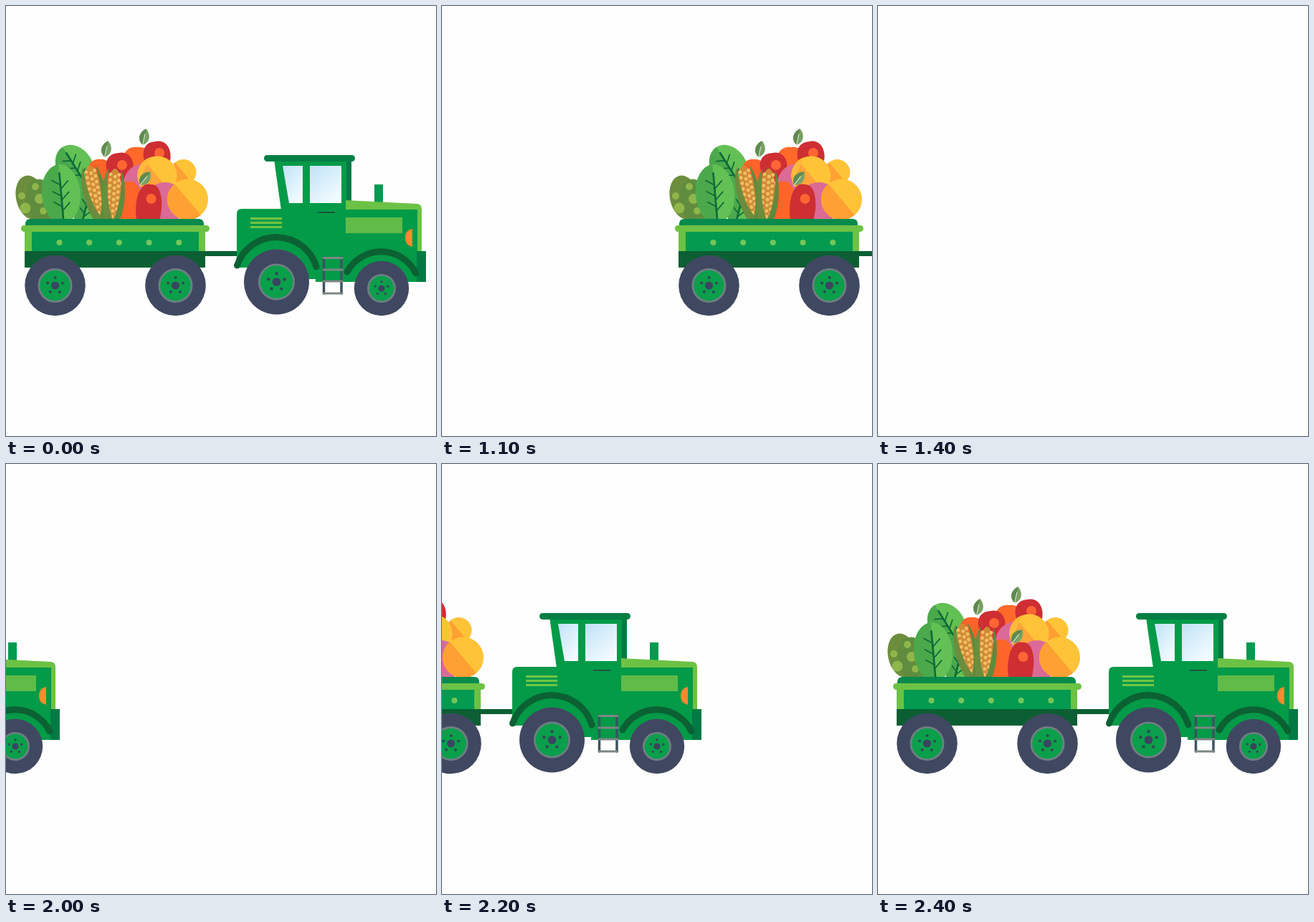
An HTML page for the animation above (3400 ms loop, 600 by 600 pixels).

```html
<!DOCTYPE html>
<html lang="en">
<head>
<meta charset="utf-8">
<title>Harvest tractor</title>
<style>
html, body { margin: 0; width: 100%; height: 100%; overflow: hidden; background: #fefefe; }
svg { display: block; width: 100%; height: 100%; }
</style>
</head>
<body>
<svg viewBox="0 0 600 600">
  <defs>
    <linearGradient id="glass" x2=".7" y2="1">
      <stop offset="0" stop-color="#bfe3f7"/><stop offset="1" stop-color="#f4fbff"/>
    </linearGradient>
    <clipPath id="above"><path d="M0 150H300V298H0Z"/></clipPath>
  </defs>
  <g id="rig">
    <g id="load" clip-path="url(#above)"></g>
    <g id="wagon"></g>
    <g id="tractor"></g>
    <g id="wheels"></g>
  </g>
</svg>
<script>
const $ = id => document.getElementById(id);
const G = { body: '#039a48', teal: '#049a50', dark: '#0b5f33', deep: '#007a44', light: '#6cc244', olive: '#6b8d3d' };

const rect = (x, y, w, h, fill, r = 0) =>
  `<rect x="${x}" y="${y}" width="${w}" height="${h}" rx="${r}" fill="${fill}"/>`;
const dot = (x, y, r, fill) => `<circle cx="${x}" cy="${y}" r="${r}" fill="${fill}"/>`;
const oval = (x, y, rx, ry, fill, turn = 0) =>
  `<ellipse cx="${x}" cy="${y}" rx="${rx}" ry="${ry}" fill="${fill}" transform="rotate(${turn} ${x} ${y})"/>`;
const shape = (d, fill) => `<path d="${d}" fill="${fill}"/>`;
const line = (d, color, w) =>
  `<path d="${d}" fill="none" stroke="${color}" stroke-width="${w}" stroke-linecap="round"/>`;
const place = (x, y, turn, inner) => `<g transform="translate(${x} ${y}) rotate(${turn})">${inner}</g>`;
const range = n => [...Array(n).keys()];

// Oval leaf with a darker left half and a branching vein
function leaf(x, y, rx, ry, turn) {
  const ribs = [-0.3, 0.08, 0.44].map(k =>
    `M0 ${ry * k}l${-rx * .42} ${-ry * .18}M0 ${ry * (k + .14)}l${rx * .4} ${-ry * .26}`).join('');
  return place(x, y, turn,
    oval(0, 0, rx, ry, '#63c054') +
    shape(`M0 ${-ry}A${rx} ${ry} 0 0 0 0 ${ry}Z`, '#4ba94c') +
    line(`M0 ${-ry * .7}V${ry}`, '#0b6a38', 2.6) + line(ribs, '#0b6a38', 1.7));
}

function corn(x, y, turn) {
  const grains = range(9).map(i => [-5, 1.5, 7].map((c, j) =>
    dot(c - 1, -28 + i * 8 + (j % 2) * 3, 2.5, '#f3bd62')).join('')).join('');
  return place(x, y, turn,
    oval(0, 0, 10.5, 36, '#cf8a38') + grains +
    shape('M-9 -36C-20 -18 -17 22 -7 42L4 40C-8 18 -10 -8 -9 -36Z', G.olive) +
    shape('M8 -36C18 -18 19 22 8 42L0 40C10 18 12 -8 8 -36Z', '#5f8a3c'));
}

// Round fruit split by a diagonal: lit upper right, shaded lower left
const peach = (x, y, r, shade) => place(x, y, 50,
  dot(0, 0, r, '#ffc338') + shape(`M${-r} 0A${r} ${r} 0 0 0 ${r} 0Z`, shade));

const apple = (x, y, w, h, fill, turn = 0) => place(x, y, turn,
  shape(`M0 ${-h}C${w * .9} ${-h * 1.1} ${w * 1.25} ${-h * .2} ${w * .8} ${h * .6}` +
    `Q${w * .5} ${h} 0 ${h}Q${-w * .5} ${h} ${-w * .8} ${h * .6}C${-w * 1.25} ${-h * .2} ${-w * .9} ${-h * 1.1} 0 ${-h}Z`, fill));

const sprig = (x, y, turn) => place(x, y, turn,
  shape('M0 -12C9 -5 9 6 0 11C-9 6 -9 -5 0 -12Z', '#78a064') +
  shape('M0 -12C-9 -5 -9 6 0 11Z', '#5f8a50') + line('M0 -4V12', '#e6ecd8', 1));

function wheel(x, y, r, hub) {
  const bolts = range(5).map(i => {
    const a = (i * 72 - 72) * Math.PI / 180 - .3;
    return dot(x + hub * .46 * Math.cos(a), y + hub * .46 * Math.sin(a), hub * .085, '#2f4a55');
  }).join('');
  return dot(x, y, r, '#404861') + dot(x, y, hub, '#6c8083') + dot(x, y, hub - 2.8, '#0a9f4a') +
    bolts + dot(x, y, hub * .23, '#3b4560');
}

$('load').innerHTML =
  leaf(96, 224, 25, 32, -32) +
  oval(50, 272, 20, 31, '#5c9140', -14) + oval(34, 267, 20, 31, G.olive, -12) +
  oval(44, 272, 15, 29, '#5f8c3e', -10) +
  [[22, 265, 5], [41, 252, 5], [47, 269, 7], [27, 282, 7.5], [52, 286, 5]]
    .map(([x, y, r]) => dot(x, y, r, '#8fb64a')).join('') +
  leaf(113, 275, 18, 34, 14) + leaf(77, 262, 27, 41, -5) +
  apple(183, 222, 21, 25, '#ff6a2b') + apple(131, 238, 18, 24, '#ff6428') +
  apple(211, 210, 19, 21, '#cd2f33', -10) + dot(214, 205, 7, '#ff6534') +
  apple(159, 225, 19, 20, '#cd2f33', -8) + dot(162, 222, 7, '#ff6534') +
  dot(192, 248, 28, '#db6a96') +
  peach(247.5, 232, 18, '#ffa033') + peach(211, 237, 27.5, '#ffa53a') +
  shape('M185 227Q190 215 201 211L186 246Q181 237 185 227Z', '#ffb93a') +
  dot(222, 275, 29, '#db6a96') + peach(253.5, 270, 28.5, '#ffa033') +
  apple(172, 284, 18, 39, '#ff6428') +
  apple(199, 284, 18, 35, '#cd2f33', 4) + dot(202.5, 269, 7, '#ff6534') +
  corn(123, 258, -11) + corn(150, 263, 4) +
  sprig(140, 200, 12) + sprig(193, 183, 12) + sprig(194, 241, 38);

$('wagon').innerHTML =
  rect(278, 342, 48, 7, G.dark) +
  rect(26, 342, 252, 23, G.dark) + rect(26, 313, 252, 29, G.teal) +
  rect(26, 313, 10, 29, G.light) + rect(269, 313, 9, 29, G.light) +
  shape('M27 307V303Q28 297 34 297H269Q275 297 276 303V307Z', '#078a4c') +
  rect(21, 306, 263, 9, G.light, 4.5) +
  range(5).map(i => dot(74.5 + i * 41.7, 330, 4, '#74c65a')).join('');

$('tractor').innerHTML =
  rect(514, 249, 12, 28, G.teal) +
  rect(474, 217, 8, 60, G.deep) +
  shape('M374 214H475V285H384Z', G.body) + rect(360, 208, 127, 9, '#047f44', 4.5) +
  shape('M386 223H414V275H395Z', 'url(#glass)') + shape('M424 223H468V275H424Z', 'url(#glass)') +
  shape('M322 290Q322 283 329 283H474L574 284V342H580V385H432V381H400V365H320L322 350Z', G.body) +
  shape('M474 271L574 276Q580 277 580 283V342H574V284H474Z', G.light) +
  rect(474, 295, 79, 22, '#60bb48') + rect(573, 342, 13, 43, G.deep) +
  shape('M567 311V336Q557 334 557 323.5Q557 313 567 311Z', '#ff8a2c') +
  [295, 301, 307].map(y => rect(341, y, 44, 3, '#70c544')).join('') +
  rect(435, 287, 24, 2, '#16583f') +
  rect(442, 385, 28, 17, '#fefefe') +
  line('M443.5 351V401M468 351V401', '#3e5261', 3.5) +
  line('M443 351.5H469M443 368H469M443 384H469M443 401H469', '#7d8784', 3) +
  line('M322.5 362A58 58 0 0 1 433 364', '#0b6132', 9) +
  line('M476 371A54 54 0 0 1 572 373', '#0b6132', 9);

$('wheels').innerHTML =
  wheel(68.5, 390, 42.3, 24) + wheel(236.5, 390, 42.3, 24) +
  wheel(377.5, 385, 45.5, 25.5) + wheel(524, 394, 38.2, 20);

// The drive advances in hard steps of 100 ms
const LOOP = 3400, STEP = 100, EASE = .54;
const leaving = [117, 304, 486, 576];
const arrive = k => -600 * (1 - k * (1 - EASE) - k * k * (3 - 2 * k) * EASE);

function offset(t) {
  if (t < 1000 || t >= 2400) return 0;
  if (t < 1400) return leaving[Math.floor((t - 1000) / STEP)];
  if (t < 2000) return 700;
  return Math.round(arrive((Math.floor((t - 2000) / STEP) + 1) / 5));
}

const start = performance.now();
function draw() {
  const t = (performance.now() - start) % LOOP;
  $('rig').setAttribute('transform', `translate(${offset(t)} 0)`);
  requestAnimationFrame(draw);
}
draw();
</script>
</body>
</html>
```
